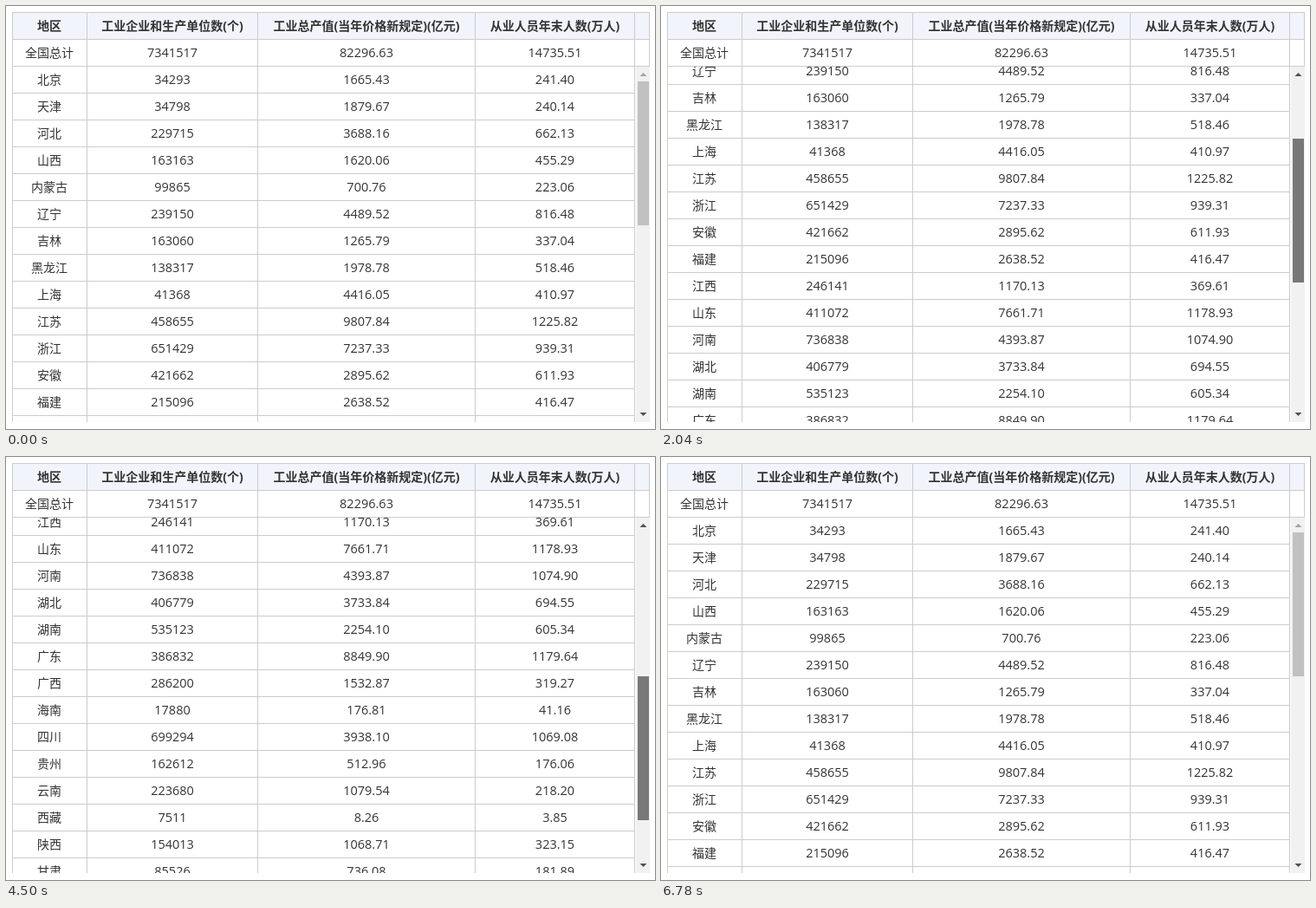
These frames come from a looping animation (749x488 px, 7.68 s). An HTML page:

```html
<!DOCTYPE html>
<html lang="zh-CN">
<head>
<meta charset="utf-8">
<style>
html, body { margin: 0; width: 100%; height: 100%; overflow: hidden; background: #fff; }
svg { display: block; }
text { font: 14px "Open Sans", "Noto Sans", "Noto Sans CJK SC", "Noto Sans CJK", sans-serif; fill: #333; text-anchor: middle; }
.num { font-size: 14.5px; }
.head { font-weight: bold; }
.line { fill: #ccc; }
</style>
</head>
<body>
<svg id="stage" width="749" height="488" viewBox="0 0 749 488"></svg>
<script>
const LOOP = 7680, STEP = 60, ROW = 31, TOP = 70, BOTTOM = 480;
const SCROLL_MAX = 520, THUMB_MAX = 210;
const centers = [50, 192, 416, 633.5];
const columns = [7, 93, 290, 541, 725];
const header = ['地区', '工业企业和生产单位数(个)', '工业总产值(当年价格新规定)(亿元)', '从业人员年末人数(万人)'];
const total = ['全国总计', '7341517', '82296.63', '14735.51'];
const rows = `北京 34293 1665.43 241.40
天津 34798 1879.67 240.14
河北 229715 3688.16 662.13
山西 163163 1620.06 455.29
内蒙古 99865 700.76 223.06
辽宁 239150 4489.52 816.48
吉林 163060 1265.79 337.04
黑龙江 138317 1978.78 518.46
上海 41368 4416.05 410.97
江苏 458655 9807.84 1225.82
浙江 651429 7237.33 939.31
安徽 421662 2895.62 611.93
福建 215096 2638.52 416.47
江西 246141 1170.13 369.61
山东 411072 7661.71 1178.93
河南 736838 4393.87 1074.90
湖北 406779 3733.84 694.55
湖南 535123 2254.10 605.34
广东 386832 8849.90 1179.64
广西 286200 1532.87 319.27
海南 17880 176.81 41.16
四川 699294 3938.10 1069.08
贵州 162612 512.96 176.06
云南 223680 1079.54 218.20
西藏 7511 8.26 3.85
陕西 154013 1068.71 323.15
甘肃 85526 736.08 181.89
青海 15982 150.42 48.13
宁夏 25211 186.08 58.20
新疆 50252 742.17 152.63`.split('\n').map(r => r.split(' '));

const rect = (x, y, w, h, attrs) => `<rect x="${x}" y="${y}" width="${w}" height="${h}" ${attrs}/>`;
const line = (x, y, w, h) => rect(x, y, w, h, 'class="line"');
const cells = (row, y, head) => row.map((s, i) =>
  `<text x="${centers[i]}" y="${y}" class="${head ? 'head' : i ? 'num' : ''}">${s}</text>`).join('');

const stage = document.getElementById('stage');
stage.innerHTML =
  `<clipPath id="view">${rect(7, TOP, 719, BOTTOM - TOP, '')}</clipPath>` +
  rect(7, 7, 736, 31, 'fill="#f2f4fb"') +
  cells(header, 28, true) + cells(total, 59) +
  `<g clip-path="url(#view)"><g id="body">` +
  rows.map((r, i) => cells(r, 90 + i * ROW) + line(7, 100 + i * ROW, 719, 1)).join('') +
  `</g></g>` +
  [7, 38, 69].map(y => line(7, y, 736, 1)).join('') +
  columns.map(x => line(x, 7, 1, BOTTOM - 7)).join('') +
  line(742, 7, 1, 63) +
  rect(727, TOP, 16, BOTTOM - TOP, 'fill="#f1f1f1"') +
  rect(729, 87, 13, 166, 'id="thumb"') +
  `<path id="up" d="M731.5 81l4-4 4 4z"/><path id="down" d="M731.5 469l4 4 4-4z"/>`;
const [body, thumb, up, down] = ['body', 'thumb', 'up', 'down'].map(id => document.getElementById(id));

// Drag path of the pointer: time, distance in px, speed in px/ms
const drag = [
  [1020, 0, .03], [2040, 67, .09], [2820, 152, .115], [3360, 210, .09],
  [4140, 210, -.1], [4500, 167, -.115], [5880, 37, -.08], [6420, 0, -.04]
];

function dragAt(t) {
  if (t <= 1020 || t >= 6420) return 0;
  if (t >= 3360 && t <= 4140) return THUMB_MAX;
  const i = drag.findIndex(k => k[0] > t);
  const [t0, p0, v0] = drag[i - 1], [t1, p1, v1] = drag[i];
  const d = t1 - t0, u = (t - t0) / d, w = 1 - u;
  const p = p0 * w * w * (1 + 2 * u) + p1 * u * u * (3 - 2 * u) + d * u * w * (v0 * w - v1 * u);
  return Math.max(0, Math.min(THUMB_MAX, Math.round(p)));
}

function draw(now) {
  const t = Math.floor((now % LOOP) / STEP) * STEP;
  const scroll = Math.floor(dragAt(t) * SCROLL_MAX / THUMB_MAX);
  body.setAttribute('transform', `translate(0 ${-scroll})`);
  thumb.setAttribute('y', 87 + Math.floor(scroll * THUMB_MAX / SCROLL_MAX));
  thumb.setAttribute('fill', t < 420 || t >= 6780 ? '#c1c1c1' : t < 1020 ? '#a8a8a8' : '#787878');
  up.setAttribute('fill', scroll > 0 ? '#505050' : '#a3a3a3');
  down.setAttribute('fill', scroll < SCROLL_MAX ? '#505050' : '#a3a3a3');
}

const start = performance.now();
function tick() {
  draw(performance.now() - start);
  requestAnimationFrame(tick);
}
tick();
</script>
</body>
</html>
```
